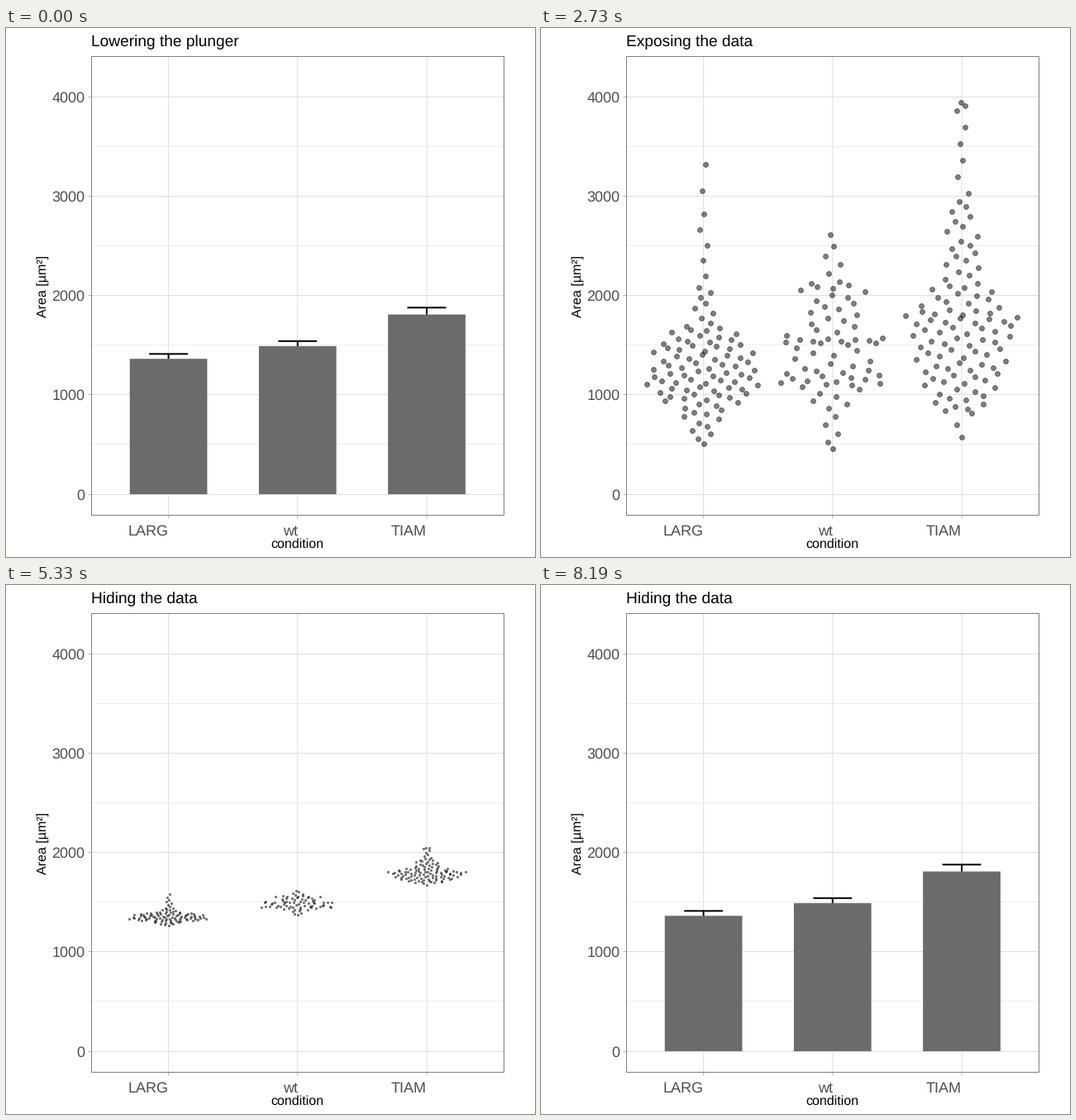
Write a matplotlib script that moves like this. It is 640 by 640 pixels and loops after 8.32 s.

```python
import matplotlib.pyplot as plt
import numpy as np
from matplotlib.animation import FuncAnimation
from matplotlib.patches import Rectangle

SIZE, DPI = 640, 100
FRAMES, INTERVAL = 64, 130
PT = 72 / DPI                      # points per pixel
LEFT, RIGHT, TOP, BOTTOM = 103.5, 602.5, 34.5, 589.5
STEP = 156.2                       # distance between categories
BAR_HALF, CAP_HALF = 0.3 * STEP, 0.15 * STEP
EXPOSE, HIDE, REBUILD = 15, 36, 57

# "keys" are a few quantiles of the areas, spaced more closely in the tails.
GROUPS = [
    dict(name="LARG", count=99, mean=1362, err=49,
         keys=[524, 608, 786, 941, 1048, 1156, 1276, 1416, 1541, 1694,
               2090, 2850, 3287]),
    dict(name="wt", count=74, mean=1490, err=50,
         keys=[474, 560, 873, 1088, 1161, 1265, 1515, 1569, 1817, 2037,
               2128, 2451, 2595]),
    dict(name="TIAM", count=110, mean=1808, err=69,
         keys=[592, 830, 945, 1129, 1304, 1511, 1706, 1850, 2109, 2534,
               2955, 3850, 3903]),
]


def y_px(value):
    return 564 - 0.12025 * value


def van_der_corput(i):
    result, scale = 0.0, 0.5
    while i:
        result += scale * (i & 1)
        i >>= 1
        scale /= 2
    return result


def areas(keys, count):
    nodes = (1 - np.cos(np.linspace(0, np.pi, len(keys)))) / 2
    return np.interp(np.linspace(0, 1, count), nodes, keys)


def swarm_offsets(values):
    """Quasirandom spread in -1..1, scaled by the kernel density."""
    n = len(values)
    q1, q3 = np.percentile(values, [25, 75])
    spread = min(values.std(ddof=1), (q3 - q1) / 1.34)
    bandwidth = 0.45 * spread * n ** -0.2

    def density(at):
        z = (at[:, None] - values[None, :]) / bandwidth
        return np.exp(-z * z / 2).sum(axis=1)

    peak = density(np.linspace(values[0], values[-1], 400)).max()
    side = np.array([2 * van_der_corput(i) - 1 for i in range(1, n + 1)])
    return side * density(values) / peak


def spring(t, damping=0.23, omega=0.365):
    wave = np.cos(omega * t) + damping / omega * np.sin(omega * t)
    return 1 - np.exp(-damping * t) * wave


def title_at(n):
    if n <= 10:
        return "Lowering the plunger"
    if n <= EXPOSE:
        return f"Count-down: {3 - (n - 11) // 2}"
    return "Exposing the data" if n < HIDE else "Hiding the data"


def bar_state(n):
    """Opacity of the bars and relative height of the error bars."""
    if n <= EXPOSE:
        return np.clip((15 - n) / 5, 0, 1), np.clip(1 - n / 10, 0, 1)
    return np.clip((n - REBUILD + 1) / 3, 0, 1), np.clip((n - 59) / 4, 0, 1)


plt.rcParams.update({"font.family": "Liberation Sans", "path.snap": False,
                     "text.hinting": "none"})
fig = plt.figure(figsize=(SIZE / DPI, SIZE / DPI), dpi=DPI, facecolor="white")
ax = fig.add_axes([0, 0, 1, 1])
ax.set_xlim(0, SIZE)
ax.set_ylim(SIZE, 0)
ax.axis("off")


def line(xs, ys, color, width=1, z=1):
    return ax.plot(xs, ys, color=color, lw=width * PT, zorder=z,
                   solid_capstyle="butt")[0]


def label(x, y, text, px, color="black", **kw):
    return ax.text(x, y, text, fontsize=px * PT, color=color,
                   va="baseline", **kw)


for value in range(0, 4001, 500):
    y = int(y_px(value)) + 0.5
    major = value % 1000 == 0
    line([LEFT, RIGHT], [y, y], "#dedede" if major else "#eeeeee")
    if major:
        line([99.5, LEFT], [y, y], "#b3b3b3")
        label(95.5, y + 6.5, str(value), 18, "#4d4d4d", ha="right")

bars, stems, caps = [], [], []
for i, group in enumerate(GROUPS):
    x = group["x"] = 196.6 + STEP * i
    group["values"] = areas(group["keys"], group["count"])
    group["offsets"] = swarm_offsets(group["values"])
    line([x, x], [TOP, BOTTOM], "#dedede")
    line([x, x], [BOTTOM, 593.5], "#b3b3b3")
    label(x, 614, group["name"], 18, "#4d4d4d", ha="right")
    top = y_px(group["mean"])
    bars.append(ax.add_patch(Rectangle(
        (x - BAR_HALF, top), 2 * BAR_HALF, y_px(0) - top,
        fc="#6b6b6b", lw=0, zorder=2)))
    stems.append(line([x, x], [top, top], "black", 2, 3))
    caps.append(line([x - CAP_HALF, x + CAP_HALF], [top, top], "black", 2, 3))

dots = ax.scatter([], [], facecolors=[(0, 0, 0, 0.5)],
                  edgecolors=[(0, 0, 0, 0.5)], linewidths=0.85 * PT, zorder=4)
ax.add_patch(Rectangle((LEFT, TOP), RIGHT - LEFT, BOTTOM - TOP, fill=False,
                       ec="#7f7f7f", lw=PT, zorder=5))
title = label(102.7, 22, "", 19.2, ha="left")
label(352.5, 629, "condition", 16, ha="center")
label(48.5, 312, "Area [µm²]", 16, ha="center", rotation=90,
      rotation_mode="anchor")


def place_dots(n):
    hiding = n >= HIDE
    stretch = 1 - spring(n - HIDE) if hiding else spring(n - EXPOSE)
    narrow = 0.3 if hiding else 0.15
    width = (narrow + (0.45 - narrow) * stretch) * STEP
    points = []
    for g in GROUPS:
        ys = y_px(g["mean"] + (g["values"] - g["mean"]) * stretch)
        points.append(np.column_stack([g["x"] + g["offsets"] * width, ys]))
    dots.set_offsets(np.concatenate(points))
    radius = 0.85 + 2.1 * stretch
    dots.set_sizes([(2 * radius * PT) ** 2])


def update(n):
    title.set_text(title_at(n))
    alpha, height = bar_state(n)
    for g, bar, stem, cap in zip(GROUPS, bars, stems, caps):
        base = y_px(g["mean"])
        tip = y_px(g["mean"] + g["err"] * height)
        bar.set_alpha(alpha)
        stem.set_ydata([base, tip])
        cap.set_ydata([tip, tip])
        stem.set_visible(alpha > 0)
        cap.set_visible(alpha > 0)
    exposed = EXPOSE < n < REBUILD
    dots.set_visible(exposed)
    if exposed:
        place_dots(n)
    return [title, dots, *bars, *stems, *caps]


anim = FuncAnimation(fig, update, frames=FRAMES, interval=INTERVAL,
                     repeat=True, repeat_delay=0, blit=False)
plt.show()
```
